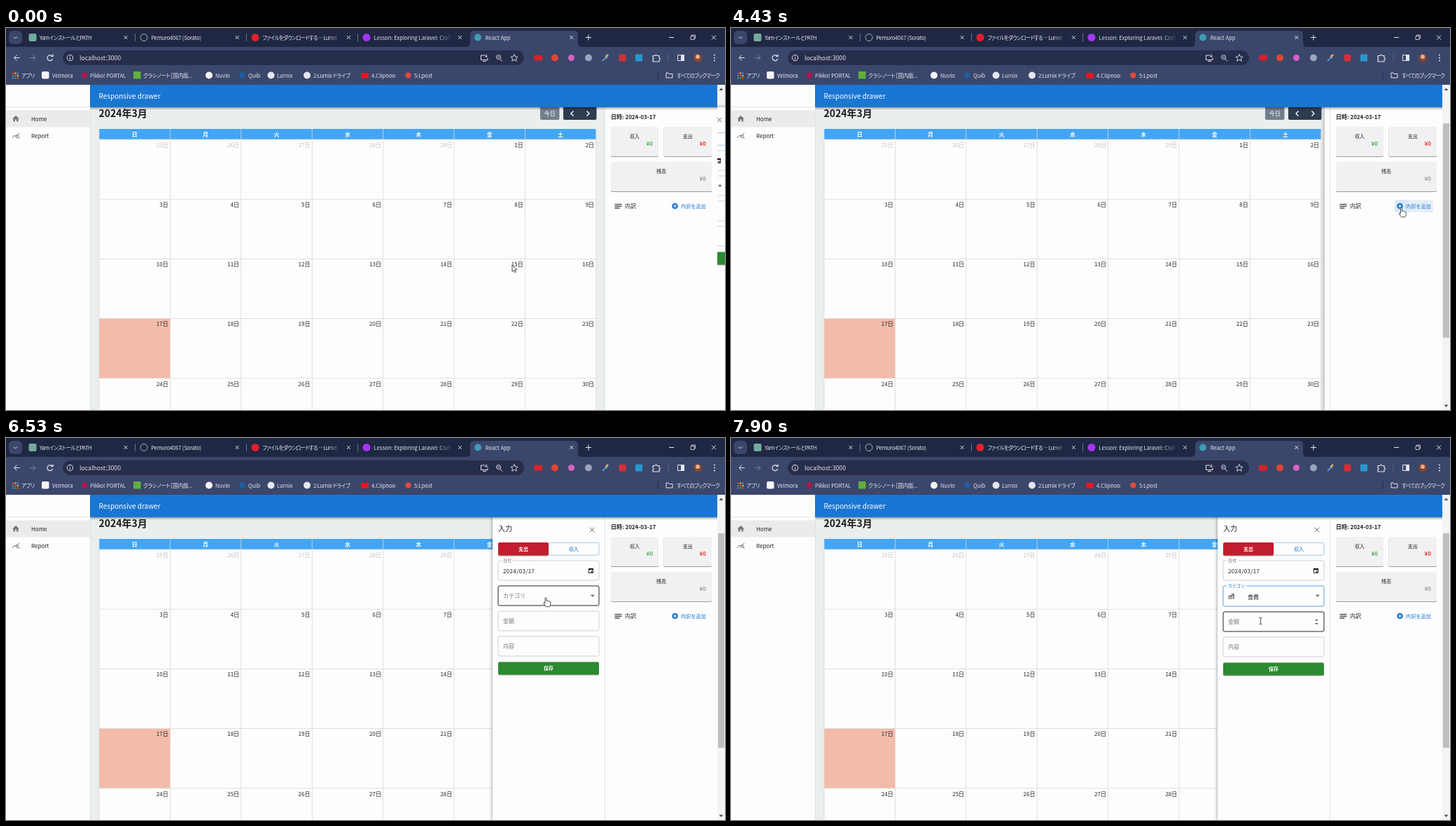
Animation of 1027 by 545 pixels, one loop 8 s. Source, as an HTML page:

```html
<!DOCTYPE html>
<html lang="ja">
<head>
<meta charset="utf-8">
<title>Calendar</title>
<style>
html, body { margin: 0; width: 100%; height: 100%; overflow: hidden; background: #fdfdfd; }
svg { display: block; width: 100%; height: 100%; font-family: "Noto Sans CJK JP", "Noto Sans", sans-serif; }
text { white-space: pre; }
.ui { font-feature-settings: "palt"; }
.card { filter: drop-shadow(0 1px .7px #0006); }
#drawer { filter: drop-shadow(0 0 2.5px #0007); }
#paper { filter: drop-shadow(0 2px 2.5px #0007); }
</style>
</head>
<body>
<svg id="stage" viewBox="0 0 1027 545"></svg>
<script>
const BLUE = '#1976d2', INK = '#222', GREY = '#757575', WHITE = '#fdfdfd', LIGHT = '#e4e7ee';
const STRIP = '#1f2742', BAR = '#3b466b', LINE = '#c4c4c4';

const rect = (x, y, w, h, fill, more = '') => `<rect x="${x}" y="${y}" width="${w}" height="${h}" fill="${fill}" ${more}/>`;
const text = (x, y, s, size = 8, fill = INK, more = '') => `<text x="${x}" y="${y}" font-size="${size}" fill="${fill}" ${more}>${s}</text>`;
const line = (d, color = LIGHT, w = 1, more = '') => `<path d="${d}" fill="none" stroke="${color}" stroke-width="${w}" ${more}/>`;
const dot = (x, y, r, fill, more = '') => `<circle cx="${x}" cy="${y}" r="${r}" fill="${fill}" ${more}/>`;
const icon = (d, x, y, size, fill = GREY) =>
  `<path d="${d}" fill="${fill}" fill-rule="evenodd" transform="translate(${x - size / 2} ${y - size / 2}) scale(${size / 24})"/>`;
const cross = (x, y, r, color, w = 1) => line(`M${x - r} ${y - r}l${2 * r} ${2 * r}m0 ${-2 * r}l${-2 * r} ${2 * r}`, color, w);
const disc = (x, y, r) => `M${x - r} ${y}a${r} ${r} 0 1 0 ${2 * r} 0a${r} ${r} 0 1 0 ${-2 * r} 0z`;
const BOLD = 'font-weight="700"', MEDIUM = 'font-weight="500"', MID = 'text-anchor="middle"', END = 'text-anchor="end"';

const FOOD = 'M1 15c0-8 15-8 15 0zM1 17h15v2H1zM1 21h15v2H1zM18 23h3L23 5h-5V1h-2v4h-5v2q7 2 7 8z';
const categories = [
  ['食費', FOOD],
  ['日用品', 'M1 2h3l1 2h16l-4.500 9H8l-1 2h12v2H5v-3l1.500-2L3 4H1z' + disc(7, 20, 2) + disc(17, 20, 2)],
  ['住居費', 'M1 11v10h5v-6h4v6h5V11L8 6zM10 3v2l7 5v11h6V3zM17 7h2v2h-2z'],
  ['交際費', disc(4, 9, 2.3) + disc(12, 8, 3) + disc(20, 9, 2.3) + 'M0 18v-3q4-4 6 0v3zM7 18v-3q5-5 10 0v3zM18 18v-3q3-4 6 0v3z'],
  ['趣味', 'M7 5h10q3 0 4 4l1.500 8q-1 4-4 2l-4-4h-5l-4 4q-3 2-4-2L3 9q1-4 4-4zM7 8v2H5v2h2v2h2v-2h2v-2H9V8z' + disc(16, 10, 1.3)],
  ['旅費', 'M21 16v-2l-8-5V3.500q-1.500-3-3 0V9l-8 5v2l8-2.500V19l-2 1.500V22l3.500-1 3.500 1v-1.500L13 19v-5.500z'],
  ['教育費', disc(12, 12, 9) + disc(12, 12, 7) + disc(3, 12, 2) + disc(21, 12, 2) + disc(9, 10, 1.4) + disc(15, 10, 1.4) + 'M7 14h10q-5 6-10 0z'],
  ['保健', 'M3 3h18v18H3zM18 14v-4h-4V6h-4v4H6v4h4v4h4v-4z'],
  ['医療費', 'M3 4h6v2H8v3h2v10H7v4H5v-4H2V9h2V6H3zM5 11v6h2v-6zM14 9h8v13h-8zM15 5h6v3h-6zM16 13v6h4v-6z'],
  ['ペット', disc(4.5, 9.5, 2.5) + disc(9, 5.5, 2.5) + disc(15, 5.5, 2.5) + disc(19.5, 9.5, 2.5) + 'M12 11q3 0 7 7 0 5-7 3-7 2-7-3 4-7 7-7z'],
  ['勉強', 'M5 13v4l7 4 7-4v-4l-7 4zM12 3L1 9l11 6 9-5v7h2V9z']
];

function browser() {
  const ui = (x, y, s, size = 7.65, gap = 0) => text(x, y, s, size, LIGHT, `class="ui" letter-spacing="${gap}"`);
  let s = rect(0, 0, 1027, 81, BAR) + rect(0, 0, 1027, 27, STRIP);
  s += rect(4, 4, 19, 19, BAR, 'rx="6"') + line('M11 12.500l2.500 2.500 2.500-2.500');
  s += `<path d="M657 27q6 0 6-6V10q0-6 6-6h142q6 0 6 6v11q0 6 6 6z" fill="${BAR}"/>`;
  [['YarnインストールとPATH', -.5], ['Pemuro4067 (Sorato)', -.2], ['ファイルをダウンロードする — Lumet', -.8],
    ['Lesson: Exploring Laravel: Craft', 0], ['React App', 0]].forEach(([name, gap], i) => {
    const x = 48 + i * 159.2;
    s += ui(x, 16.5, name, 7.65, gap);
    if (i == 2 || i == 3) s += rect(x + 92, 5, 19, 18, 'url(#fade)') + rect(x + 111, 5, 10, 18, STRIP);
    s += cross(x + 123, 13.5, 2.4, LIGHT);
    if (i < 3) s += rect(184 + i * 159, 8, 1, 11, '#69718e');
  });
  s += rect(32.5, 8, 11, 11, '#74aa9c', 'rx="2"') + dot(197, 13.5, 5, 'none', 'stroke="#aab1bf"') + dot(356, 13.5, 5.5, '#e0202c');
  s += dot(515, 13.5, 5.5, '#a435f0') + dot(674, 13.5, 5, '#3d9db8');
  s += line('M828 13.500h8m-4-4v8') + line('M947 13.500h7') + line('M978 11.500h5v5h-5zM979.500 11.500v-1.500h5v5h-1.500', LIGHT, .8) + cross(1011, 13.500, 3, LIGHT);

  s += rect(81, 32, 659, 21, '#272e4c', 'rx="10.5"') + ui(105, 45.7, 'localhost:3000', 8.7);
  s += line('M19.500 42.500h-8m4-4l-4 4 4 4') + line('M34 42.500h8m-4-4l4 4-4 4', '#7c86a5');
  s += line('M66 40a4 4 0 1 0 .7 4M67 37.500v3h-3', LIGHT, 1.2);
  s += line(disc(91.5, 42.5, 4.2) + 'M91.500 42v3m0-5v1');
  s += line('M684 39h-5.500v6.500h9.500v-3M681 47.500h5M686 37.500v4m-1.800-1.800l1.800 1.800 1.800-1.800');
  s += line(disc(703.5, 41.5, 3) + 'M705.500 44l3.500 3.500M702 41.500h3');
  s += line('M726 37.500l1.500 3.300 3.500.4-2.600 2.400.8 3.600-3.200-1.900-3.200 1.900.8-3.600-2.600-2.400 3.500-.4z', LIGHT, .9);
  s += rect(754, 38.5, 12, 8, '#d9202b', 'rx="2"') + dot(784, 42.5, 5, '#df4632') + dot(807.5, 42.5, 4.5, '#d563c4');
  s += dot(832, 42.5, 5, '#9aa5bd') + line('M852 47l5-5m-1-2l3 3', '#65b5ec', 1.5) + line('M857 41l3-3', '#e7b23e', 2.5);
  s += rect(875.5, 37.5, 10, 10, '#cf3038', 'rx="2"') + rect(899, 37.5, 10, 10, '#2798ce', 'rx="1"');
  s += line('M924 39.500h3q1.500-3 3 0h3v3q3 1.500 0 3v2.500h-9v-3q2-1 0-2.500z', LIGHT, 1.2) + rect(945.5, 37, 1, 11, '#58648a');
  s += line('M959.500 38.500h9v8h-9z') + rect(964, 38, 5, 9, LIGHT) + dot(988, 42.5, 6, '#87442f') + dot(988, 41, 3, '#e0b294');
  [38.5, 42.5, 46.5].forEach(y => s += dot(1012, y, 1, LIGHT));

  const hues = ['#ea4335', '#fbbc04', '#4285f4', '#34a853'];
  for (let i = 0; i < 9; i++) s += rect(9 + i % 3 * 3.4, 63.5 + (i / 3 | 0) * 3.4, 2.2, 2.2, hues[i % 4]);
  [[22, 'アプリ', -.6], [66, 'Velmora'], [120, 'Pikko! PORTAL', -.1], [196, 'クラシノート［国内版...', -.2], [299, 'Nuvlo'], [346, 'Quib'],
    [387, 'Lurnix'], [439, '2:Lurnix ドライブ', -.3], [522, '4.Clipnoo'], [583, '5:Lpost'], [958, 'すべてのブックマーク', -.8]]
    .forEach(([x, name, gap]) => s += ui(x, 70.5, name, 7.65, gap));
  s += rect(51, 62, 10.5, 10.5, '#f5f5f5', 'rx="2"') + dot(112, 67.5, 4, '#b3164d') + rect(182, 62, 10.5, 10.5, '#5faf3c');
  s += dot(290, 67.5, 5, '#f5f5f5') + dot(337, 67.5, 4, '#1b5fa8') + dot(378.5, 67.5, 5, LIGHT) + dot(430, 67.5, 5, LIGHT);
  s += rect(507, 64, 11, 7.5, '#f0141c', 'rx="2"') + dot(574.5, 67.5, 4, '#e34a3c') + rect(930.5, 62, 1, 11, '#1f2742');
  return s + line('M943 64h3l1 1.500h5v5.500h-9z');
}

function calendar() {
  const w = 101.4, h = 85.2;
  let s = rect(120, 81, 736, 464, '#eaeeef') + rect(133, 159, 710, 386, WHITE) + rect(133, 144, 710, 15, '#42a5f5');
  s += text(132.5, 127, '2024年3月', 14, '#1b1b1b', BOLD);
  s += rect(763, 108, 27.5, 23, '#737f8a', 'rx="2"') + text(776.7, 125, '今日', 8, '#fff', MID);
  s += rect(796, 108, 47.5, 23, '#2c3e50', 'rx="2"') + line('M810.500 118.500l-3.500 3.500 3.500 3.500M829.500 118.500l3.500 3.500-3.500 3.500', '#fff', 1.4);
  s += rect(133, 159 + 3 * h, w, h, '#f3bbaa');
  for (let c = 0; c < 7; c++) {
    s += text(133 + (c + .5) * w, 154.5, '日月火水木金土'[c], 8, '#fff', MID + BOLD.padStart(18));
    for (let r = 0; r < 5; r++) {
      const n = r * 7 + c - 4, old = n < 1;
      s += text(133 + (c + 1) * w - 2.7, 169.800 + r * h, (old ? n + 29 : n) + '日', 8, old ? '#c3c3c3' : INK, END);
    }
  }
  for (let c = 0; c < 8; c++) s += rect(132.6 + c * w, 144, .8, 401, '#d9d9d6');
  for (let r = 0; r < 5; r++) s += rect(133, 158.600 + r * h, 710, .8, '#d9d9d6');
  return s;
}

function sidebar() {
  let s = rect(0, 81, 120, 464, WHITE) + rect(120, 81, .8, 464, '#dcdcdc') + rect(0, 112.5, 120, .8, '#dedede') + rect(0, 117.5, 120, 24, '#ebebeb');
  s += icon('M10 20v-6h4v6h5v-8h3L12 3 2 12h3v8z', 14, 129.5, 12) + text(36, 132.5, 'Home') + text(36, 156.7, 'Report');
  return s + line('M9 157l3-4 2.500 2 4.500-5.500', GREY, 1) + line(disc(16, 154.5, 2) + 'M17.500 156l2 2', GREY, 1);
}

function panel() {
  const card = (x, y, w, name, fill) => rect(x, y, w, 42, '#f1f1f3', 'rx="2" class="card"') +
    text(x + w / 2, y + 15.5, name, 7, INK, MID) + text(x + w - 8, y + 27, '¥0', 8, fill, `${END} ${BOLD}`);
  let s = rect(855, 113, 161, 432, WHITE) + rect(855, 113, .8, 432, '#dcdcdc');
  s += text(864, 130, '日時: 2024-03-17', 8, INK, BOLD);
  s += card(864, 141, 68, '収入', '#4caf50') + card(939.5, 141, 68.5, '支出', '#f03a32');
  s += card(864, 191, 144, '残高', '#9b9b9b');
  s += line('M869.500 251.500h10m-10 2.700h10m-10 2.700h7', INK, 1.2) + text(884, 257);
  s = s.replace('undefined', '内訳');
  s += rect(948, 245, 55, 18, BLUE, 'id="hover" rx="2" opacity="0"') + dot(957, 256, 0, BLUE, 'id="wave" clip-path="url(#button)"');
  return s + dot(955.5, 254, 4.3, BLUE) + line('M953 254h5m-2.500-2.500v5', '#fff', 1) + text(964, 256.7, '内訳を追加', 7, BLUE, `${MEDIUM} letter-spacing=".2"`);
}

function form() {
  const box = (y, id = '') => rect(703, y, 144, 28, 'none', `id="${id}" rx="2" stroke="${LINE}" stroke-width=".8"`);
  let s = rect(695, 113, 161, 432, WHITE) + text(703, 133, '入力', 10, INK, MEDIUM) + cross(837.2, 131, 3.3, '#666');
  s += rect(775, 149.400, 72, 17.800, WHITE, 'rx="2" stroke="#8cbae8" stroke-width=".8"') + text(811, 160.5, '収入', 7, BLUE, MID);
  s += rect(703, 149, 72, 18.500, '#c41c2f', 'rx="2" class="card"') + text(739, 160.5, '支出', 7, '#fff', `${MID} ${BOLD}`);
  s += box(175) + rect(708, 173, 16, 4, WHITE) + text(710, 177.3, '日付', 6, '#666') + text(710, 192.5, '2024/03/17', 8, INK, 'letter-spacing=".35"');
  s += line('M832.500 186.500h6v6h-6z', '#111', .9) + rect(832, 186, 7, 2.2, '#111') + rect(835.5, 189.7, 2, 2, '#111');
  s += box(211, 'pick') + rect(708, 209, 28, 4, WHITE, 'id="gap"') + `<g id="label">${text(0, 0, 'カテゴリ', 8, 'inherit')}</g>`;
  s += `<path id="arrow" d="M-3 -1.300h6l-3 3z" fill="#666"/>`;
  s += `<g id="chosen">${icon(FOOD, 714.7, 225.5, 10)}${text(738, 229.5, '食費')}</g>`;
  s += `<g id="low">${box(247, 'amount')}${text(710, 264, '金額', 8, '#777')}`;
  s += `<path id="spin" d="M834.500 259.500h4l-2-2.500zM834.500 263h4l-2 2.500z" fill="#444"/>`;
  s += box(283, 'note') + text(710, 300, '内容', 8, '#777');
  return s + rect(703, 319.500, 144, 18, '#2c8a30', 'rx="2" class="card"') + text(775, 331, '保存', 7, '#fff', `${MID} ${BOLD}`) + '</g>';
}

function menu() {
  let s = rect(703, 241, 144.5, 204.5, WHITE, 'id="paper" rx="2"') + rect(703, 243.5, 144.5, 17.8, '#efeff0');
  s += dot(736, 252, 0, '#000', 'id="ripple" opacity=".12" clip-path="url(#row)"');
  categories.forEach(([name, d], i) => s += icon(d, 716.3, 252.5 + i * 18.05, 9.6, '#666') + text(729, 255.7 + i * 18.05, name));
  return s;
}

stage.innerHTML = `<defs>
  <linearGradient id="fade"><stop stop-color="${STRIP}" stop-opacity="0"/><stop offset="1" stop-color="${STRIP}"/></linearGradient>
  <linearGradient id="shade" x2="0" y2="1"><stop stop-opacity=".35"/><stop offset="1" stop-opacity="0"/></linearGradient>
  <clipPath id="button">${rect(948, 245, 55, 18, '#000', 'rx="2"')}</clipPath>
  <clipPath id="row">${rect(703, 243.5, 144.5, 17.8, '#000')}</clipPath></defs>
  ${calendar()}
  <g id="scroll">${rect(1016, 81, 11, 464, '#f4f4f4') + rect(1017, 136, 9, 306, '#bfbfbf')}
    <path d="M1018.500 89h6l-3-3.500zM1018.500 537.500h6l-3 3.500z" fill="#555"/></g>
  <g id="side"><g id="drawer">${form()}</g>${panel()}</g>
  <g id="list">${menu()}</g>
  ${rect(120, 113, 896, 4, 'url(#shade)', 'id="shadow"') + sidebar() + rect(120, 81, 896, 32, BLUE, 'id="top"')}
  ${text(132.5, 101, 'Responsive drawer', 10, '#fff', MEDIUM) + browser()}
  <g id="cursor" stroke="#222" stroke-width=".8" stroke-linejoin="round" fill="#fff">
    <path id="point" d="M0 0v9.500l2.200-2 1.600 3.300 1.500-.7-1.500-3.200h3z"/>
    <path id="hand" d="M-1 1q1-2 2 0v4q1-1 2 .3 1-.8 2 .4 1.500-.5 1.700 1v3q0 2-1.500 3.500h-5L-3 8.500q-.3-2 2-.5z"/>
    <path id="beam" d="M-2 -4.500h1.500l.5.500.5-.500H2M0 -4v8M-2 4.500h1.500l.5-.500.5.500H2" fill="none"/></g>`;

const $ = id => document.getElementById(id);
const set = (id, attrs) => { for (const k in attrs) $(id).setAttribute(k, attrs[k]); };
const show = (id, on) => set(id, { visibility: on ? 'visible' : 'hidden' });
const ramp = (t, a, b) => Math.min(1, Math.max(0, (t - a) / (b - a)));
const ease = p => p * p * (3 - 2 * p);

const track = [[30, 723, 338], [260, 790, 336], [500, 790, 336], [930, 867, 339.5], [2100, 867, 339.5], [2130, 864, 342],
  [2700, 864, 342], [2860, 324, 410], [3300, 324, 410], [3330, 320, 414], [3360, 319, 415], [3830, 319, 415], [4230, 957.5, 256.5],
  [4660, 957.5, 256.5], [5460, 800, 360], [5700, 800, 360], [6300, 775, 244], [6460, 775, 244], [6530, 771, 227.5],
  [6800, 771, 227.5], [7200, 751, 248], [7600, 751, 248], [7880, 756.5, 261]];

function cursorAt(t) {
  const i = track.findIndex(k => k[0] > t);
  if (i < 1) return track[i ? track.length - 1 : 0].slice(1);
  const a = track[i - 1], b = track[i], p = ease(ramp(t, a[0], b[0]));
  return [a[1] + (b[1] - a[1]) * p, a[2] + (b[2] - a[2]) * p];
}

function draw(t) {
  const [x, y] = cursorAt(t);
  const inside = (l, top, r, b) => x > l && x < r && y > top && y < b;
  const slide = ease(ramp(t, 4370, 4610)), grow = ease(ramp(t, 6620, 6860)), leave = ramp(t, 7600, 7790);
  const modal = t >= 6620 && t < 7790, shift = modal ? 11 : 0, picked = t >= 7600;
  const ready = slide == 1 && !modal;
  const onButton = inside(948, 245, 1003, 263), onPick = ready && inside(703, 211, 847, 239);
  const onAmount = ready && inside(703, 247, 847, 276), onNote = ready && inside(703, 283, 847, 311);
  const onMenu = modal && inside(714, 243, 859, 446);

  set('side', { transform: `translate(${shift})` });
  set('drawer', { transform: `translate(${182 * (1 - slide)})` });
  show('scroll', !modal);
  set('top', { width: 896 + shift });
  set('shadow', { width: 896 + shift });

  set('hover', { opacity: onButton ? .1 : 0 });
  set('wave', { r: 45 * ramp(t, 4320, 4700), opacity: t > 4320 ? .05 * (1 - ramp(t, 4480, 4900)) : 0 });

  const focus = t >= 6600, up = ease(ramp(t, 6620, 6820));
  set('pick', { height: picked ? 29 : 28, stroke: focus ? (picked ? '#5f9fe0' : BLUE) : onPick ? INK : LINE, 'stroke-width': focus || onPick ? 1 : .8 });
  show('gap', up > 0);
  set('label', { fill: focus ? BLUE : '#777', transform: `translate(710 ${228 - 14.7 * up}) scale(${1 - .25 * up})` });
  set('arrow', { transform: `translate(837.800 225) scale(1 ${modal && !picked ? -1 : 1})` });
  show('chosen', picked);
  set('low', { transform: `translate(0 ${picked ? 1 : 0})` });
  for (const [id, on] of [['amount', onAmount], ['note', onNote]]) set(id, { stroke: on ? INK : LINE, 'stroke-width': on ? 1 : .8 });
  show('spin', onAmount);

  show('list', modal);
  set('list', {
    opacity: grow * (1 - leave),
    transform: `translate(${775 + shift} 241) scale(${.75 + .25 * grow} ${.5625 + .4375 * grow}) translate(-775 -241)`
  });
  set('ripple', { r: t > 7430 ? 4 + 68 * ramp(t, 7430, 7430 + 850) : 0 });

  const beam = onAmount || onNote, hand = onButton || onPick || onMenu;
  set('cursor', { transform: `translate(${x} ${y})` });
  show('beam', beam);
  show('hand', hand && !beam);
  show('point', !hand && !beam);
}

function frame() {
  draw(performance.now() % 8000);
  requestAnimationFrame(frame);
}
frame();
</script>
</body>
</html>
```
